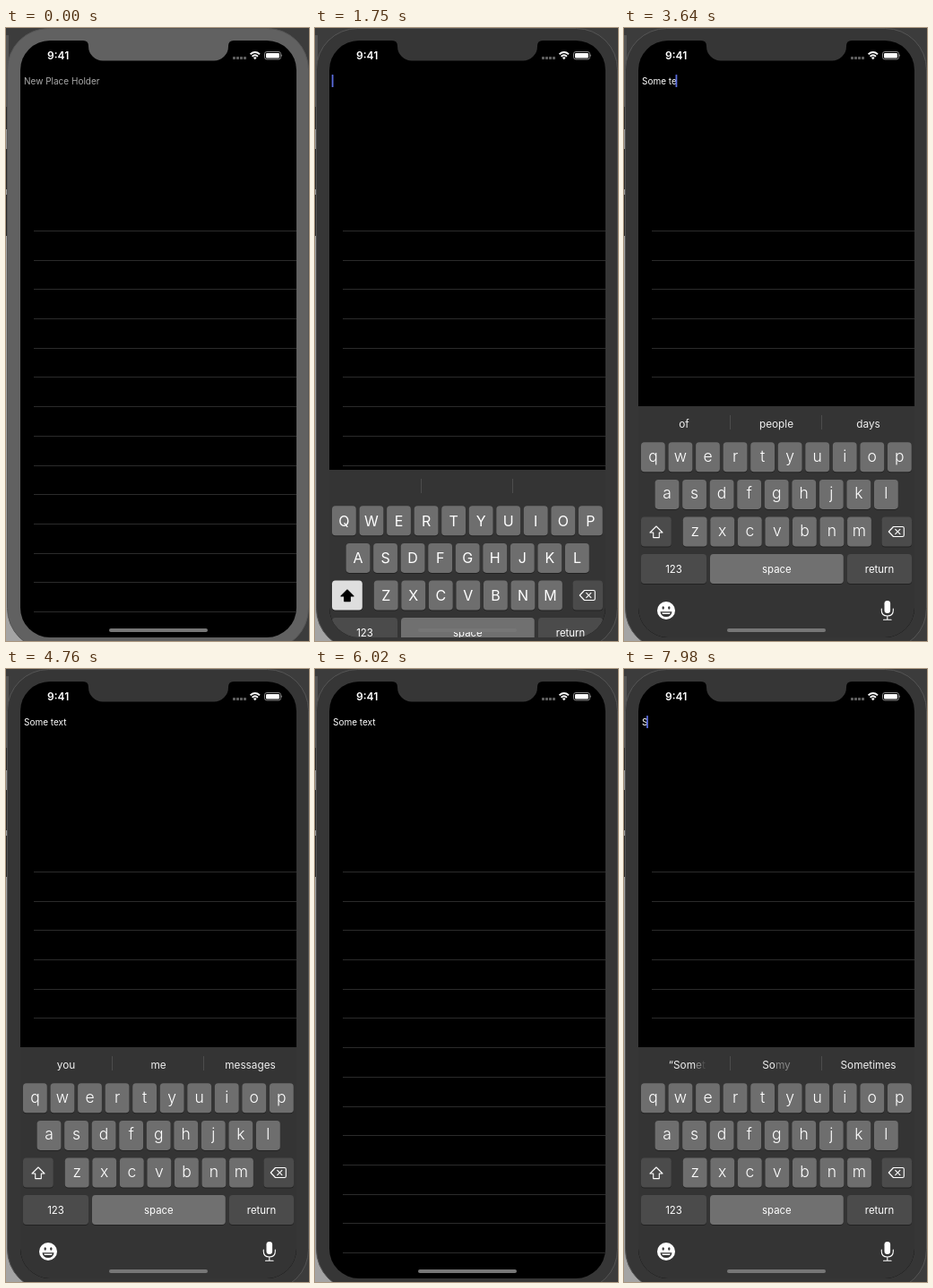
An HTML page that plays this animation: 338x684 px, repeating every 8000 ms.

```html
<!DOCTYPE html>
<html lang="en">
<head>
<meta charset="utf-8">
<title>Notes keyboard</title>
<style>
  html, body { margin: 0; width: 100%; height: 100%; overflow: hidden; background: #3c3c3c; }
  svg { display: block; width: 338px; height: 684px; font-family: Inter, Roboto, sans-serif; }
  text { white-space: pre; fill: #fff; }
  .mid { text-anchor: middle; }
  .note { font-size: 10px; }
  .hint { font-size: 11.8px; fill: #f0f0f0; }
  .upper { font-size: 16px; }
  .lower { font-size: 17.5px; font-weight: 300; }
  .word { font-size: 11.4px; }
  .icon { fill: none; stroke: #fff; stroke-width: 1.1; stroke-linejoin: round; stroke-linecap: round; }
</style>
</head>
<body>
<svg viewBox="0 0 338 684">
  <defs>
    <clipPath id="screen"><rect x="16" y="14" width="308" height="666" rx="33"/></clipPath>
  </defs>

  <!-- desktop behind the phone -->
  <rect width="338" height="684" fill="#3c3c3c"/>
  <rect y="8" width="3" height="80" fill="#555"/>
  <rect y="88" width="3" height="144" fill="#282828"/>
  <rect y="113" width="3" height="22" fill="#999"/>
  <rect y="180" width="3" height="6" fill="#999"/>
  <rect y="232" width="24" height="452" fill="#a4a4a4"/>

  <rect id="body" x="1.5" y=".5" width="336" height="693" rx="46" stroke="#555"/>

  <g clip-path="url(#screen)">
    <rect x="16" y="14" width="308" height="666"/>
    <g id="list">
      <text id="note" class="note" x="20" y="62.6"></text>
      <rect id="caret" y="52" width="1.8" height="14" rx=".6" fill="#5a6cdc"/>
    </g>
    <g id="board">
      <rect x="16" width="308" height="270" fill="#343434"/>
      <path d="M118.5 10v16M220.5 10v16" stroke="#4c4c4c"/>
      <g id="hints"></g>
      <g id="keys"></g>
      <path id="shift" class="icon" d="M36 134l7 7h-3.7v5.6h-6.6V141H29z"/>
      <path class="icon" d="M300.500 134.500h10.200q1.600 0 1.600 1.600v7.800q0 1.600-1.600 1.600h-10.200l-5.200-5.500zM302.700 137.400l5.200 5.200m0-5.200l-5.200 5.200"/>
      <g fill="#343434">
        <circle cx="47" cy="228" r="10" fill="#fff"/>
        <ellipse cx="43.700" cy="225" rx="1.200" ry="1.700"/>
        <ellipse cx="50.300" cy="225" rx="1.200" ry="1.700"/>
        <path d="M40.500 229.200h13q-.7 5.800-6.500 5.800t-6.500-5.800z"/>
        <path d="M42.300 230.400h9.400l-.6 1.500h-8.200z" fill="#fff"/>
      </g>
      <rect x="290.500" y="217" width="6.600" height="14" rx="3.300" fill="#fff"/>
      <path class="icon" d="M287.300 226v2q0 6 6.500 6t6.500-6v-2M293.800 234v4M289.500 238.300h8.600" stroke-width="1.300"/>
    </g>
    <rect x="115" y="670" width="110" height="4" rx="2" fill="#767676"/>
  </g>

  <path id="notch" d="M86 13v1q6 0 6 6v.5a16 16 0 0 0 16 16h124a16 16 0 0 0 16-16V20q0-6 6-6v-1z"/>

  <text class="mid" x="58.200" y="35" font-size="12" font-weight="600">9:41</text>
  <path d="M253 33.500h15" stroke="#5c5c5c" stroke-width="3" stroke-dasharray="3 1"/>
  <g fill="none" stroke="#fff" stroke-width="1.900">
    <path d="M272.600 29.300q5.200-4.400 10.400 0M274.600 31.700q3.200-2.700 6.400 0"/>
  </g>
  <path d="M275.900 33q1.900-1.500 3.800 0l-1.900 2.200z" fill="#fff"/>
  <rect x="288.500" y="26.500" width="18" height="8.400" rx="2.400" fill="none" stroke="#888"/>
  <rect x="290" y="28" width="15" height="5.400" rx="1.200" fill="#fff"/>
  <path d="M307.400 29.300q1.600 1.400 0 2.800z" fill="#999"/>
</svg>

<script>
const LOOP = 8000, TICK = 70;
const REST = 422, HIDDEN = 684;
const $ = id => document.getElementById(id);

function add(parent, tag, attrs, label = '') {
  const el = document.createElementNS('http://www.w3.org/2000/svg', tag);
  for (const name in attrs) el.setAttribute(name, attrs[name]);
  el.textContent = label;
  return parent.appendChild(el);
}

// ---- list separators ----
for (let i = -4; i < 14; i++) {
  if (i < 0) continue;
  add($('list'), 'rect', { x: 31, y: Math.round(225.95 + 32.7 * i), width: 293, height: 1, fill: '#2b2b2b' });
}

// ---- keyboard ----
const letters = [];
function key(x, row, width, fill) {
  const y = 40.3 + 41.6 * row;
  add($('keys'), 'rect', { x, y: y + 1, width, height: 33, rx: 3.8, fill: '#222' });
  return add($('keys'), 'rect', { x, y, width, height: 33, rx: 3.8, fill });
}
[['QWERTYUIOP', 19], ['ASDFGHJKL', 34.6], ['ZXCVBNM', 65.8]].forEach(([row, left], r) => {
  [...row].forEach((char, i) => {
    const x = left + 30.55 * i;
    key(x, r, 26.8, '#6e6e6e');
    letters.push({ char, base: 56.8 + 41.6 * r, el: add($('keys'), 'text', { x: x + 13.4 }) });
  });
});
const shiftKey = key(19, 2, 33.8, '#4b4b4b');
key(287.500, 2, 33.5, '#4b4b4b');
[['123', 19, 73, '#4b4b4b'], ['space', 96, 148.800, '#707070'], ['return', 249, 72, '#4b4b4b']]
  .forEach(([label, x, width, fill]) => {
    key(x, 3, width, fill);
    add($('keys'), 'text', { class: 'mid word', x: x + width / 2, y: 185.600 }, label);
  });
const hints = [67, 170, 272.500].map(x => add($('hints'), 'text', { class: 'mid hint', x, y: 24.300 }));

// ---- script of the scene: [time, value] ----
const edits = [
  [0, ''], [3010, 'S'], [3080, 'Som'], [3220, 'Some'], [3290, 'Some '], [3500, 'Some t'],
  [3570, 'Some te'], [3990, 'Some tex'], [4060, 'Some text'], [4200, 'Some text '],
  [7350, 'Some text'], [7420, 'Some tex'], [7490, 'Some te'], [7560, 'Some t'],
  [7630, 'Some '], [7700, 'Some'], [7770, 'Som'], [7910, 'So'], [7980, 'S']
];
// a bar marks where the label starts to fade
const offers = [
  [0, ',,'], [2450, 'I,The,I’m'], [3430, 'of,people,days'], [4270, 'you,me,messages'],
  [7630, 'of,people,days'], [7910, '\u00a0\u00a0“Som|e|t,So|my,Sometimes']
];
const blinks = [[2450, 2800], [4410, 4970], [7070, 7350]];

const at = (table, t) => table.reduce((value, step) => step[0] <= t ? step[1] : value, table[0][1]);
const clamp = (v, a = 0, b = 1) => Math.min(b, Math.max(a, v));
const spring = (ms, w) => { const p = Math.max(0, ms) * w / 1000; return (1 + p) * Math.exp(-p); };
const rubber = d => 666 * (1 - 1 / (d * .55 / 666 + 1));
const grey = v => `rgb(${v},${v},${v})`;

// finger pulls the list down, pushing the keyboard once it reaches it
const PULL = 282, GRAB = 349, RELEASE = 5460;
function pose(t) {
  if (t < 1610) return { scroll: 0, top: HIDDEN };
  if (t < 5040) return { scroll: 0, top: REST + (HIDDEN - REST) * spring(t - 1610, 18.5) };
  if (t < RELEASE) {
    const p = clamp((t - 5040) / 210), travel = PULL * p * (1.5 - .5 * p);
    return { scroll: rubber(travel), top: Math.max(REST, GRAB + travel) };
  }
  if (t < 6510) {
    const left = spring(t - RELEASE, 20);
    return { scroll: rubber(PULL) * left, top: HIDDEN - (HIDDEN - GRAB - PULL) * left };
  }
  return { scroll: 0, top: REST + (HIDDEN - REST) * spring(t - 6510, 18.5) };
}

function caretAlpha(t) {
  if (t < 1610 || (t >= 5110 && t < 6510)) return 0;
  const blink = blinks.find(([a, b]) => t >= a && t <= b);
  return blink ? Math.max(clamp(1 - (t - blink[0] + TICK) / 210), clamp(1 - (blink[1] - t) / 210)) : 1;
}

const pen = document.createElement('canvas').getContext('2d');
pen.font = '10px Inter, Roboto, sans-serif';

let upper, offer;
function setCase(isUpper) {
  if (upper === isUpper) return;
  upper = isUpper;
  for (const { char, base, el } of letters) {
    el.textContent = upper ? char : char.toLowerCase();
    el.setAttribute('class', 'mid ' + (upper ? 'upper' : 'lower'));
    el.setAttribute('y', base + (upper ? 5.800 : 4.700));
  }
  shiftKey.setAttribute('fill', upper ? '#dedede' : '#4b4b4b');
  $('shift').style.fill = upper ? '#000' : 'none';
  $('shift').style.stroke = upper ? '#000' : '#fff';
}
function setOffer(next) {
  if (offer === next) return;
  offer = next;
  next.split(',').forEach((label, i) => {
    hints[i].textContent = '';
    label.split('|').forEach((part, n) =>
      add(hints[i], 'tspan', { 'fill-opacity': [1, .45, .15][n] }, part));
  });
}

function draw(t) {
  const { scroll, top } = pose(t);
  const text = at(edits, t), waiting = t < 1610;
  const shade = grey(Math.round(97 - 43 * clamp((t - 840) / 210)));
  $('body').setAttribute('fill', shade);
  $('notch').setAttribute('fill', shade);

  $('list').setAttribute('transform', `translate(0 ${Math.round(scroll)})`);
  $('board').setAttribute('transform', `translate(0 ${Math.round(top)})`);

  $('note').textContent = waiting ? 'New Place Holder' : text;
  $('note').style.fill = waiting ? '#ababab' : '#fff';
  $('caret').setAttribute('x', 18.700 + pen.measureText(text).width);
  $('caret').setAttribute('opacity', caretAlpha(t));

  setCase(t < 3010);
  setOffer(at(offers, t));
}

const start = performance.now();
function frame() {
  const t = (performance.now() - start) % LOOP;
  draw(Math.floor(t / TICK) * TICK);
  requestAnimationFrame(frame);
}
frame();
</script>
</body>
</html>
```
